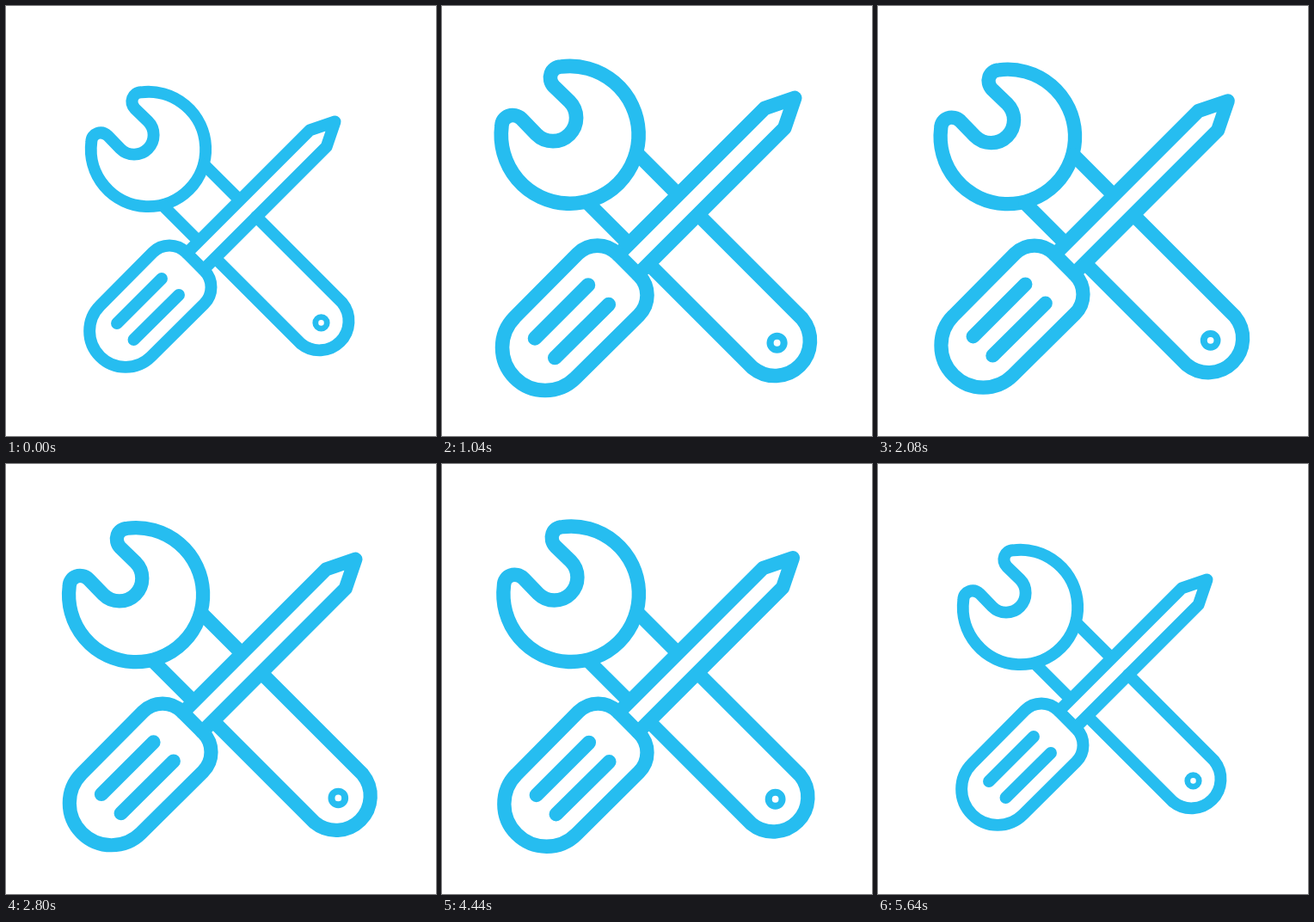
These frames come from a looping animation (500 px wide and 500 px high, 5.84 s). An HTML page:

```html
<!DOCTYPE html>
<html lang="en">
<head>
<meta charset="utf-8">
<title>Tools</title>
<style>
  html, body { margin: 0; width: 100%; height: 100%; overflow: hidden; background: #fff; }
  svg { display: block; width: 100%; height: 100%; }
  g { fill: none; stroke: #26bdf0; stroke-width: 13.9; stroke-linecap: round; stroke-linejoin: round; }
</style>
</head>
<body>
<svg viewBox="0 0 500 500">
  <g id="wrench">
    <path d="M157 100.3A66.7 66.7 0 1 1 99.3 158C99.3 148 111 144 118.5 151L133 166A22.6 22.6 0 0 0 165 134L150 119.5C143 112 147 100.5 157 100.3Z"/>
    <path d="M230.3 184.3L267.5 221.5M183 232.7L220 269.7"/>
    <path d="M291 245L390.8 344.8A34 34 0 0 1 342.9 392.6L243.6 293.3"/>
    <circle cx="366.5" cy="368.4" r="6.7" stroke-width="6.8"/>
  </g>
  <g id="driver">
    <path d="M210.3 287.4L353.3 144.4L382.6 134.4L372.6 163.7L229.6 306.7"/>
    <path d="M109.400 348.3L170.600 286.6A27.4 27.4 0 0 1 209.5 286.6L230.4 307.5A27.4 27.4 0 0 1 230.4 346.4L168.700 407.6A41.9 41.9 0 0 1 109.400 348.3Z"/>
    <path d="M181 317L129 369M201 336L148.500 388"/>
  </g>
</svg>
<script>
  const LOOP = 5840, STEP = 40, START = 360, END = 5640, MID = (START + END) / 2;
  const PEAK = 1.2;

  // from..peak: steady growth; rest: size it settles to before reversing
  const parts = [
    { id: 'wrench', x: 250, y: 250.5, from: 400, peak: 1000, rest: 1.17 },
    { id: 'driver', x: 238.5, y: 278, from: 345, peak: 855, rest: 1.165 }
  ].map(p => ({ ...p, node: document.getElementById(p.id) }));

  function scaleAt(p, t) {
    if (t < START || t >= END) return 1;
    const m = t > MID ? 2 * MID - t : t;
    if (m < p.peak) return 1 + (PEAK - 1) * Math.max(0, (m - p.from) / (p.peak - p.from));
    const left = 1 - (m - p.peak) / (MID - p.peak);
    return p.rest + (PEAK - p.rest) * left ** 3;
  }

  function draw(time) {
    const t = Math.floor((time % LOOP) / STEP) * STEP;
    for (const p of parts) {
      const s = scaleAt(p, t);
      p.node.setAttribute('transform',
        `translate(${p.x} ${p.y}) scale(${s}) translate(${-p.x} ${-p.y})`);
    }
  }

  let origin = null;
  function tick(now) {
    if (origin === null) origin = now;
    draw(now - origin);
    requestAnimationFrame(tick);
  }
  draw(0);
  requestAnimationFrame(tick);
</script>
</body>
</html>
```
